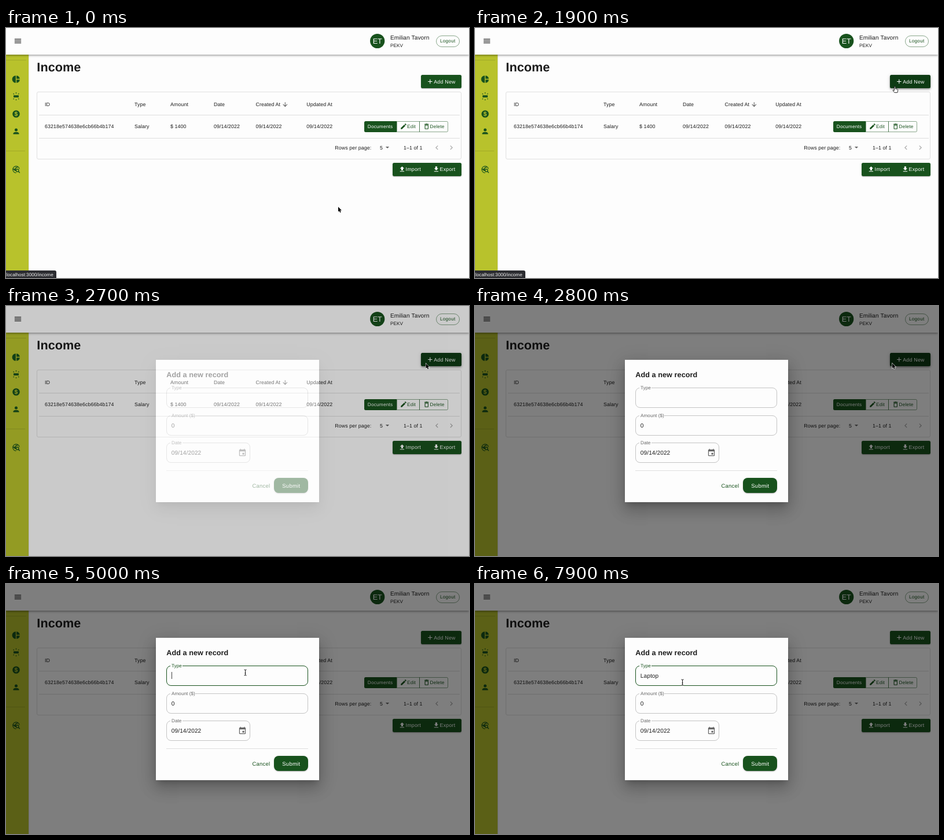
An HTML page for the animation above (8 s loop, 800 px wide and 432 px high).

```html
<!DOCTYPE html>
<html lang="en">
<head>
<meta charset="utf-8">
<title>Income</title>
<style>
  html, body { margin: 0; width: 100%; height: 100%; overflow: hidden; background: #fdfdfd; }
  #stage { position: relative; width: 800px; height: 432px; overflow: hidden; background: #fdfdfd; --green: #18521d; }
  #stage div, #stage svg { position: absolute; box-sizing: border-box; }
  .layer { left: 0; top: 0; width: 800px; height: 432px; }
  svg { overflow: visible; }
  text { font-family: "Liberation Sans", Arial, sans-serif; text-rendering: geometricPrecision; white-space: pre; }
  .header { background: #fdfdfd; box-shadow: 0 1.3px 2.5px -.6px #0003, 0 2.5px 3px #00000024, 0 .6px 6.3px #0000001f; }
  .sidebar { background: #b8c22c; box-shadow: .5px 0 1.5px #0004; }
  .rule { background: #0000001f; }
  .card { border: 1px solid #e0e0e0; border-radius: 3px; }
  .solid { background: var(--green); border-radius: 2.5px; box-shadow: 0 1.9px .6px -1.3px #0003, 0 1.3px 1.3px #00000024, 0 .6px 3.2px #0000001f; }
  .flat { background: var(--green); border-radius: 2.5px 0 0 2.5px; }
  .outline { border: .8px solid #18521d80; }
  .hover { background: #0e3b14; box-shadow: 0 1.3px 2.5px -.6px #0004, 0 2.5px 3.2px #00000030, 0 .6px 6.3px #0000002a; }
  .pressed { box-shadow: 0 3.2px 3.2px -1.9px #0003, 0 5px 6.3px .6px #00000024, 0 1.9px 8.8px 1.3px #0000001f; }
  .ripple { inset: 0; background: #fff; opacity: .27; border-radius: 2.5px; }
  .status { background: #2c2d31; border-radius: 0 3px 0 0; }
  .dialog { background: #fdfdfd; box-shadow: 0 7px 9.5px -4.4px #0003, 0 15px 24px 2px #00000024, 0 6px 29px 5px #0000001f; }
  .field { border: 1px solid #c4c4c4; border-radius: 8px; }
  .field.over { border-color: #222; }
  .field.focus { border: 1.6px solid var(--green); }
  .notch { background: #fdfdfd; }
  .submit { border-radius: 8px; }
</style>
</head>
<body>
<div id="stage"></div>
<script>
const GREEN = '#18521d', INK = '#1c1c1c', BODY = 8.82, SMALL = 8.2;
const stage = document.getElementById('stage');

const ICONS = {
  menu: 'M3 18h18v-2H3zM3 13h18v-2H3zM3 8h18V6H3z',
  pie: 'M11 2v20a10 10 0 0 1 0-20zM13 2v9h9a10 10 0 0 0-9-9zM13 13v9a10 10 0 0 0 9-9z',
  lamp: 'M5 14.5h14v-6H5zM11 .5v3h2v-3zM13 22.5v-3h-2v3zM19 3l-1.8 1.8 1.4 1.4 1.8-1.8zM20.4 18.5l-1.8-1.8-1.4 1.4 1.8 1.8zM3.6 4.5l1.8 1.8 1.4-1.4L5 3zM5 20l1.8-1.8-1.4-1.4-1.8 1.8z',
  disc: 'M2 12a10 10 0 0 1 20 0a10 10 0 0 1-20 0z',
  person: 'M8 8a4 4 0 0 1 8 0a4 4 0 0 1-8 0zM12 14c-2.7 0-8 1.3-8 4v2h16v-2c0-2.7-5.3-4-8-4z',
  down: 'M20 12l-1.4-1.4-5.6 5.6V4h-2v12.2l-5.6-5.6L4 12l8 8z',
  plus: 'M19 13h-6v6h-2v-6H5v-2h6V5h2v6h6z',
  pencil: 'M3 17.2V21h3.8L17.8 9.9l-3.7-3.7zM20.7 7c.4-.4.4-1 0-1.4l-2.3-2.3c-.4-.4-1-.4-1.4 0l-1.9 1.8 3.8 3.8z',
  bin: 'M6 19c0 1.1.9 2 2 2h8c1.1 0 2-.9 2-2V7H6zM8 9v10h8V9zM15.5 4l-1-1h-5l-1 1H5v2h14V4z',
  caret: 'M7 10l5 5 5-5z',
  prev: 'M15.4 7.4L14 6l-6 6 6 6 1.4-1.4L10.8 12z',
  next: 'M10 6L8.6 7.4l4.6 4.6-4.6 4.6L10 18l6-6z',
  upload: 'M5 20h14v-2H5zM5 10h4v6h6v-6h4l-7-7z',
  download: 'M19 9h-4V3H9v6H5l7 7zM5 18v2h14v-2z',
  event: 'M17 12h-5v5h5zM16 1v2H8V1H6v2H5a2 2 0 0 0-2 2v14a2 2 0 0 0 2 2h14a2 2 0 0 0 2-2V5a2 2 0 0 0-2-2h-1V1zM19 19H5V8h14z',
};

function box(parent, cls, x, y, w, h) {
  const el = document.createElement('div');
  el.className = cls;
  Object.assign(el.style, { left: x + 'px', top: y + 'px', width: w + 'px', height: h + 'px' });
  parent.append(el);
  return el;
}

function node(parent, tag, attrs) {
  const el = document.createElementNS('http://www.w3.org/2000/svg', tag);
  for (const key in attrs) el.setAttribute(key, attrs[key]);
  parent.append(el);
  return el;
}

const layer = () => box(stage, 'layer', 0, 0, 800, 432);
const drawing = parent => node(parent, 'svg', { class: 'layer', viewBox: '0 0 800 432' });

function text(svg, x, y, str, size = BODY, fill = INK, spacing = .0107, extra = {}) {
  const el = node(svg, 'text', { x, y, fill, 'font-size': size, 'letter-spacing': spacing * size, ...extra });
  el.textContent = str;
  return el;
}

const label = (svg, x, y, str, size, fill) => text(svg, x, y, str, size, fill, .0286);

function icon(svg, name, cx, cy, size = 15.1, fill = INK) {
  const k = size / 24;
  return node(svg, 'path', {
    d: ICONS[name], fill, 'fill-rule': 'evenodd',
    transform: `translate(${cx - size / 2} ${cy - size / 2}) scale(${k})`,
  });
}

// Page
const page = layer();
box(page, 'sidebar', 0, 44, 38.5, 390);
box(page, 'header', 0, 0, 800, 46);
box(page, 'rule', 0, 55, 35, 1);
box(page, 'rule', 0, 211.5, 33, 1);
box(page, 'outline', 743, 13, 41, 19.5).style.borderRadius = '10px';
box(page, 'card', 53, 110, 734, 117);
box(page, 'rule', 57, 150, 727, 1);
box(page, 'rule', 57, 189.5, 727, 1);
const addButton = box(page, 'solid', 717, 81, 70, 23);
const ripple = box(addButton, 'ripple', 0, 0, 70, 23);
box(page, 'solid', 668, 233, 119, 23);
box(page, 'flat', 618.5, 160.5, 56.5, 19.5);
box(page, 'outline', 674.5, 160.5, 40.5, 19.5);
box(page, 'outline', 714.2, 160.5, 49.8, 19.5).style.borderRadius = '0 2.5px 2.5px 0';

const art = drawing(page);
icon(art, 'menu', 20.5, 22.5);
icon(art, 'pie', 17.5, 88.5, 15.1, GREEN);
icon(art, 'lamp', 17.5, 118.5, 15.1, GREEN);
icon(art, 'disc', 17.5, 148.5, 15.1, GREEN);
text(art, 17.5, 152.2, '$', 10.5, '#b8c22c', 0, { 'text-anchor': 'middle', 'font-weight': 700 });
icon(art, 'person', 17.5, 178.5, 15.1, GREEN);

const globe = node(art, 'g', { transform: 'translate(10 237) scale(.63)', fill: 'none', stroke: GREEN, 'stroke-width': 2 });
node(globe, 'path', { d: 'M20.8 10A9 9 0 1 0 12 21M15 4v1c0 1.1-.9 2-2 2h-2v2c0 .6-.4 1-1 1H8v2h2v3H9L4 10' });
node(globe, 'circle', { cx: 15.5, cy: 14.5, r: 3.5 });
node(globe, 'path', { d: 'M18 17l4 4' });

node(art, 'circle', { cx: 641.7, cy: 22.5, r: 12.6, fill: GREEN });
text(art, 641.7, 27, 'ET', 12.6, '#fff', 0, { 'text-anchor': 'middle' });
text(art, 664, 20.3, 'Emilian Tavorn', 10.08);
text(art, 664, 33.4, 'PEKV', 8.15);
label(art, 750, 25.3, 'Logout', SMALL, GREEN);
text(art, 53.3, 75.2, 'Income', 21.6, INK, .004, { 'font-weight': 700 });

const columns = [
  [67, 'ID', '63218e574638e6cb66b4b174'], [222, 'Type', 'Salary'], [284, 'Amount', '$ 1400'],
  [359, 'Date', '09/14/2022'], [431.5, 'Created At', '09/14/2022'], [519.3, 'Updated At', '09/14/2022'],
];
for (const [x, head, value] of columns) {
  text(art, x, 135.4, head);
  text(art, x, 173.2, value);
}
icon(art, 'down', 482.3, 132.2, 11.8, '#555');

label(art, 624.8, 173, 'Documents', SMALL, '#fff');
icon(art, 'pencil', 687, 170, 12.8, GREEN);
label(art, 693, 173, 'Edit', SMALL, GREEN);
icon(art, 'bin', 726.7, 170, 12.8, GREEN);
label(art, 732.5, 173, 'Delete', SMALL, GREEN);

text(art, 568.3, 209.8, 'Rows per page:');
text(art, 646, 209.8, '5');
icon(art, 'caret', 659, 206.2, 15.1, '#666');
text(art, 687, 209.8, '1–1 of 1');
icon(art, 'prev', 744.5, 206.7, 15.1, '#aaa');
icon(art, 'next', 769.5, 206.7, 15.1, '#aaa');

icon(art, 'plus', 732.8, 92.5, 12.6, '#fff');
label(art, 739.2, 95.7, 'Add New', BODY, '#fff');
icon(art, 'upload', 684.4, 244, 12.6, '#fff');
label(art, 690.5, 247.2, 'Import', BODY, '#fff');
icon(art, 'download', 743.4, 244, 12.6, '#fff');
label(art, 749.5, 247.2, 'Export', BODY, '#fff');

const status = layer();
box(status, 'status', 0, 419, 86.5, 13);
text(drawing(status), .8, 428.6, 'localhost:3000/income', 8.15, '#f2f2f2', 0);

// Dialog with backdrop
const modal = layer();
box(modal, 'layer', 0, 0, 800, 432).style.background = 'rgba(0,0,0,.5)';
box(modal, 'dialog', 259, 92.5, 281.5, 246.5);
const typeField = box(modal, 'field', 277, 141, 245, 35);
box(modal, 'field', 277, 188.5, 245, 35);
box(modal, 'field', 277, 236.3, 145, 35);
box(modal, 'notch', 283.5, 139.5, 21.5, 4);
box(modal, 'notch', 283.5, 187, 43, 4);
box(modal, 'notch', 283.5, 234.8, 21, 4);
box(modal, 'rule', 277, 284, 245, 1);
box(modal, 'solid submit', 463, 297, 59, 26);

const form = drawing(modal);
text(form, 277.2, 122.6, 'Add a new record', 12.6, INK, .0075, { 'font-weight': 700 });
const typeLabel = text(form, 286, 144, 'Type', 8.1);
text(form, 286, 191.6, 'Amount ($)', 8.1, '#666');
text(form, 286, 239.4, 'Date', 8.1, '#666');
const typed = text(form, 285.8, 161.9, '', 10.08);
const caret = node(form, 'rect', { y: 152, width: .8, height: 12, fill: '#111' });
text(form, 285.8, 209.8, '0', 10.08);
text(form, 285.8, 257.4, '09/14/2022', 10.08);
icon(form, 'event', 408.5, 253.7, 15.1, '#666');
label(form, 425.4, 313.6, 'Cancel', 9.45, GREEN);
label(form, 477.3, 313.6, 'Submit', 9.45, '#fff');

// Pointer
const pointer = node(drawing(layer()), 'g', {});
const shapes = {
  arrow: node(pointer, 'path', { d: 'M0 0V8.6L1.9 6.9 3.2 9.9 4.7 9.2 3.4 6.3H6z', fill: '#000', stroke: '#fff', 'stroke-width': 1.1, 'paint-order': 'stroke' }),
  hand: node(pointer, 'path', { d: 'M-1 .8a.9.9 0 0 1 1.8 0V4L4.4 4.8Q5.4 5.2 5.2 6.4L4.4 10.6H-.6L-3.6 6.8Q-3.4 5.4-1 7z', fill: '#fff', stroke: '#000', 'stroke-width': .8 }),
  beam: node(pointer, 'g', { fill: 'none' }),
};
for (const [stroke, width] of [['#fffc', 1.8], ['#000', .9]])
  node(shapes.beam, 'path', { d: 'M-2-5Q0-5 0-4Q0-5 2-5M0-4V4M-2 5Q0 5 0 4Q0 5 2 5M-1 1H1', stroke, 'stroke-width': width });

// start, end, from, to
const MOVES = [
  [800, 1700, [574, 309], [725.5, 101]],
  [2500, 2600, [725.5, 101], [725.5, 99.3]],
  [2700, 2800, [725.5, 99.3], [721, 99]],
  [2800, 3600, [721, 99], [413.5, 153]],
  [7300, 7700, [413.5, 153], [358.5, 170]],
];
const KEYS = [6100, 6300, 6500, 6700, 6900, 7100];
const CARET_ON = [[4100, 4600], [5000, 5400], [6000, 7600]];

const clamp = v => Math.min(1, Math.max(0, v));
const within = (t, a, b) => t >= a && t < b;
const smooth = p => p * p * (3 - 2 * p);
const show = (el, on) => { el.style.display = on ? '' : 'none'; };

function pointerAt(t) {
  const [a, b, from, to] = MOVES.findLast(m => t >= m[0]) || MOVES[0];
  const p = smooth(clamp((t - a) / (b - a)));
  return from.map((v, i) => v + (to[i] - v) * p);
}

function render(t) {
  const [x, y] = pointerAt(t);
  const inField = t >= 2800 && x > 277 && x < 522 && y > 141 && y < 176;
  const kind = inField ? 'beam' : within(t, 1700, 2600) ? 'hand' : 'arrow';
  pointer.setAttribute('transform', `translate(${x} ${y})`);
  for (const name in shapes) show(shapes[name], name === kind);
  show(pointer, !within(t, 6100, 7300));

  addButton.classList.toggle('hover', within(t, 1700, 2900));
  addButton.classList.toggle('pressed', within(t, 2300, 2700));
  show(ripple, within(t, 2300, 2700));
  ripple.style.clipPath = `circle(${20 + (t - 2300) / 4}px at 9px 19px)`;
  status.style.opacity = clamp((2300 - t) / 200);

  show(modal, t >= 2700);
  modal.style.opacity = t < 2800 ? .4 : 1;
  const focused = t >= 4100;
  typeField.classList.toggle('focus', focused);
  typeField.classList.toggle('over', inField && !focused);
  typeLabel.setAttribute('fill', focused ? GREEN : '#666');
  typed.textContent = 'Laptop'.slice(0, KEYS.filter(k => t >= k).length);
  const on = CARET_ON.some(([a, b]) => within(t, a, b));
  show(caret, on);
  if (on) caret.setAttribute('x', 286 + (typed.textContent ? typed.getComputedTextLength() : 0));
}

const start = performance.now();
function tick() {
  const t = (performance.now() - start) % 8000;
  render(Math.floor(t / 100) * 100);
  requestAnimationFrame(tick);
}
tick();
</script>
</body>
</html>
```
